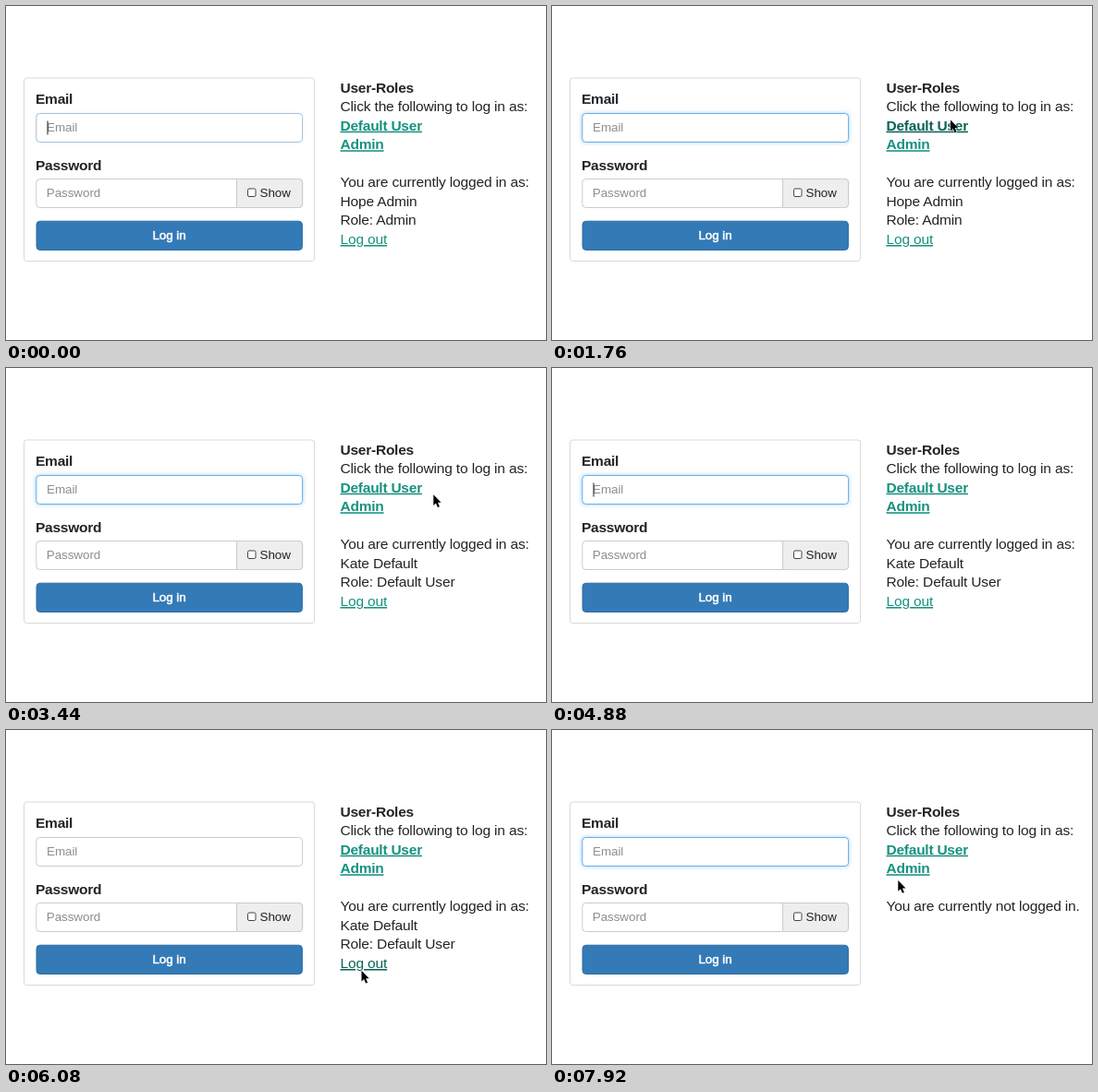
These frames come from a looping animation (584x362 px, 8000 ms). An HTML page:

```html
<!DOCTYPE html>
<html lang="en">
<head>
<meta charset="utf-8">
<title>Login form</title>
<style>
  html, body { margin: 0; width: 100%; height: 100%; overflow: hidden; background: #fff; }
  svg { display: block; width: 584px; height: 362px; }
  text { font: 15.5px "Liberation Sans", Arial, sans-serif; letter-spacing: -.15px; fill: #212326; white-space: pre; }
  .b { font-weight: bold; letter-spacing: -.24px; }
  .s { font-size: 13.4px; letter-spacing: -.05px; }
  .ph { fill: #8d8d8d; }
  .link { fill: #16917f; text-decoration: underline; text-decoration-skip-ink: none; }
  .link.hover { fill: #0b6255; }
  .box { fill: #fff; stroke: #ccc; }
</style>
</head>
<body>
<svg viewBox="0 0 584 362">
  <defs>
    <filter id="blur" filterUnits="userSpaceOnUse" x="10" y="95" width="335" height="75">
      <feGaussianBlur stdDeviation="2.6"/>
    </filter>
  </defs>

  <rect class="box" x="19.5" y="78" width="314" height="198.5" rx="3" style="stroke:#d8d8d8"/>
  <text class="b" x="32" y="106.3">Email</text>
  <rect id="glow" x="32" y="116" width="289" height="32" rx="4" fill="#66afe9" fill-opacity=".55" filter="url(#blur)"/>
  <rect id="email" class="box" x="32.8" y="116.5" width="287.8" height="31" rx="3.8"/>
  <text class="s ph" x="44" y="136.3">Email</text>
  <rect id="caret" x="44.5" y="124.5" width="1" height="15" fill="#222"/>

  <text class="b" x="32" y="177.5">Password</text>
  <rect class="box" x="32.8" y="187.5" width="287.8" height="31" rx="3.8"/>
  <path d="M249.5 187.5H316.8a3.8 3.8 0 0 1 3.8 3.8V214.7a3.8 3.8 0 0 1-3.8 3.8H249.5Z" fill="#eee" stroke="#ccc"/>
  <text class="s ph" x="43.8" y="207.4">Password</text>
  <rect x="261.5" y="198" width="8.5" height="8.5" rx="1.5" fill="#fff" stroke="#444"/>
  <text class="s" x="274.5" y="207.4">Show</text>

  <rect x="33" y="233.2" width="287.4" height="31.3" rx="3.8" fill="#337ab7" stroke="#2e6da4"/>
  <text class="s" x="176.5" y="253" text-anchor="middle" style="fill:#fff;stroke:#fff;stroke-width:.55">Log in</text>

  <g id="roles"></g>
  <path id="cursor" d="M0 0V11.7L2.6 9.2L4.6 13.8L6.6 12.9L4.7 8.5H8.2Z" fill="#000" stroke="#fff" stroke-width="1" paint-order="stroke"/>
</svg>
<script>
const LOOP = 8000, STEP = 80;
const $ = id => document.getElementById(id);
const within = (t, spans) => spans.some(([a, b]) => t >= a && t < b);
const mix = (a, b, p) => a + (b - a) * p;

// Right-hand column, one text per row
function addRow(row, text, cls = '') {
  const el = document.createElementNS('http://www.w3.org/2000/svg', 'text');
  el.setAttribute('x', 361.5);
  el.setAttribute('y', 93.6 + 20.55 * row);
  el.setAttribute('class', cls);
  el.textContent = text;
  $('roles').append(el);
  return el;
}
addRow(0, 'User-Roles', 'b');
addRow(1, 'Click the following to log in as:');
const status = addRow(5, ''), user = addRow(6, ''), role = addRow(7, '');
const links = [
  { el: addRow(2, 'Default User', 'b link'), right: 451, top: 121 },
  { el: addRow(3, 'Admin', 'b link'), right: 407, top: 142 },
  { el: addRow(8, 'Log out', 'link'), right: 413, top: 244 }
];
const logout = links[2].el;

const caretOn = [[0, 400], [880, 1360], [1840, 2080], [2800, 3440],
  [3920, 4400], [4880, 5360], [6560, 7040], [7440, 7920]];

// Pointer visits: points are [time, x, y], each leg eases out
const visits = [
  { end: 4480, pts: [[1360, 548, 184], [1760, 431, 123.5], [1920, 430, 124], [3360, 430, 124],
    [3440, 462.3, 137.3], [3520, 461, 141], [4320, 461, 141], [4400, 540, 200]] },
  { end: 6880, pts: [[5040, 534, 279], [5520, 383.5, 260], [5680, 384.5, 260.8],
    [6480, 384.5, 260.8], [6800, 571, 281]] },
  { end: 8000, pts: [[7440, 537, 205], [7920, 374.3, 163]] }
];

function pointer(t) {
  const v = visits.find(v => t >= v.pts[0][0] && t < v.end);
  if (!v) return null;
  const i = v.pts.findIndex(p => p[0] > t);
  if (i < 0) return v.pts[v.pts.length - 1].slice(1);
  const [t0, x0, y0] = v.pts[i - 1], [t1, x1, y1] = v.pts[i];
  const p = 1 - (1 - (t - t0) / (t1 - t0)) ** 1.6;
  return [mix(x0, x1, p), mix(y0, y1, p)];
}

// Focus strength of the email field, 0 to 1
function focus(t) {
  for (const [blur, on] of [[2080, 3040], [5840, 6800]]) {
    if (t >= blur && t < on) return Math.max(0, 1 - (t - blur + STEP) / 320);
    if (t === on) return 0.4;
  }
  return t < STEP ? 0.4 : 1;
}

function showSession(t) {
  const active = t < 6400, admin = t < 2800;
  status.textContent = active ? 'You are currently logged in as:' : 'You are currently not logged in.';
  user.textContent = !active ? '' : admin ? 'Hope Admin' : 'Kate Default';
  role.textContent = !active ? '' : admin ? 'Role: Admin' : 'Role: Default User';
  logout.style.display = active ? '' : 'none';
}

function draw(ms) {
  const t = Math.floor((ms % LOOP) / STEP) * STEP;
  const f = focus(t), pos = pointer(t);
  $('glow').setAttribute('opacity', f * f);
  $('email').style.stroke = `rgb(${mix(204, 102, f)},${mix(204, 175, f)},${mix(204, 233, f)})`;
  $('caret').style.display = within(t, caretOn) ? '' : 'none';
  showSession(t);
  $('cursor').style.display = pos ? '' : 'none';
  if (pos) $('cursor').setAttribute('transform', `translate(${pos[0]} ${pos[1]})`);
  for (const { el, right, top } of links) {
    const hit = pos && pos[0] >= 362 && pos[0] <= right && pos[1] >= top && pos[1] < top + 20;
    el.classList.toggle('hover', !!hit);
  }
}

const start = performance.now();
function tick() {
  draw(performance.now() - start);
  requestAnimationFrame(tick);
}
tick();
</script>
</body>
</html>
```
